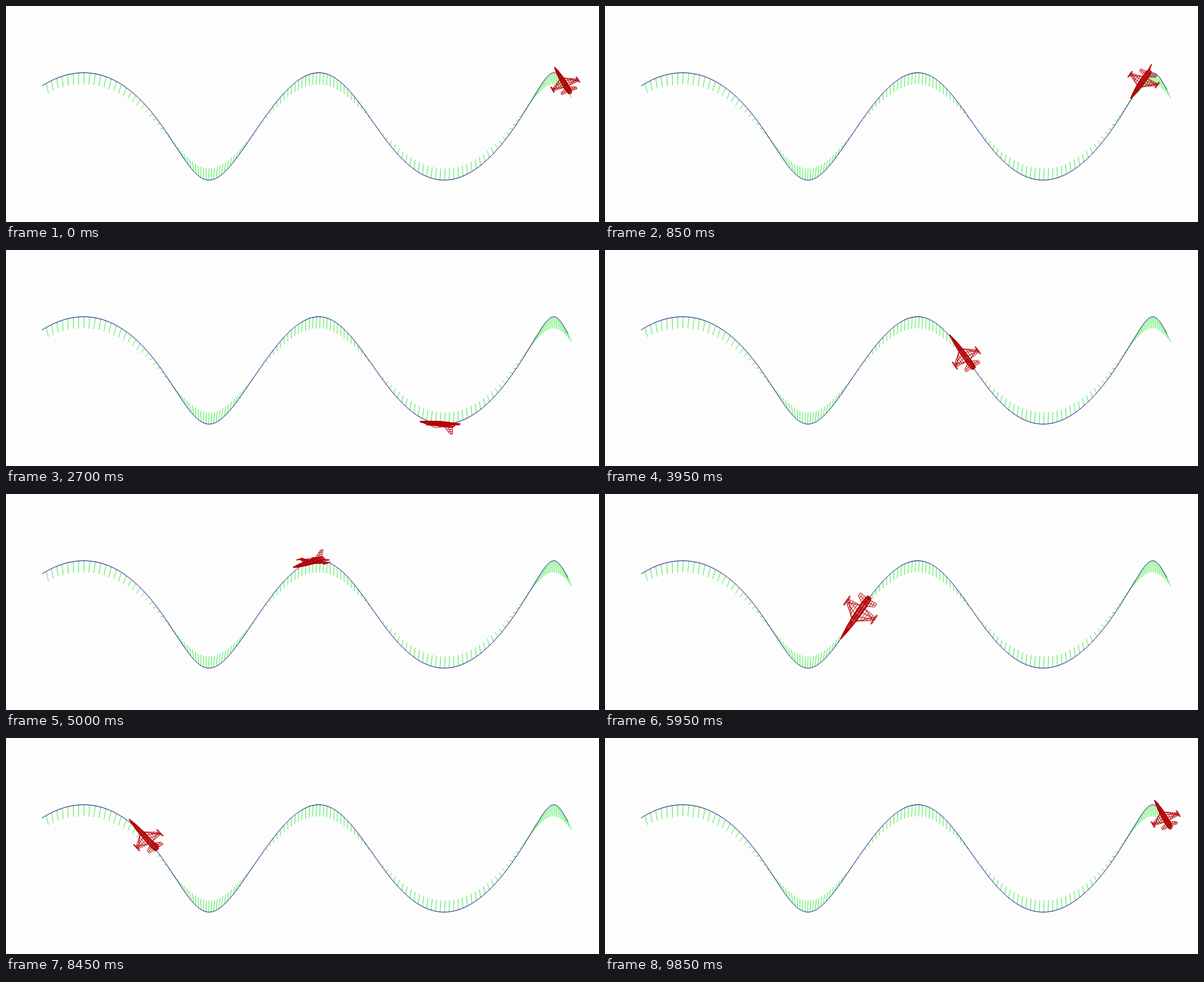
An HTML page with a canvas that plays this animation: 787x287 px, repeating every 9.9 s.

```html
<!DOCTYPE html>
<html lang="en">
<head>
<meta charset="utf-8">
<title>Flight along a curve</title>
<style>
  html, body { margin: 0; width: 100%; height: 100%; overflow: hidden; background: #fefdfe; }
  canvas { display: block; }
</style>
</head>
<body>
<canvas id="stage" width="787" height="287"></canvas>
<script>
const ctx = document.getElementById('stage').getContext('2d');
const { sin, cos, hypot, PI } = Math;
const W = 787, H = 287, LOOP = 9900, STEP = 50;
const R = 71.3, PITCH = 49.66, SHEAR = 4.52, LEAN = 5.25;
const T_MIN = -7, T_MAX = 7.11, TICK = 0.0942, TICK_SCALE = 0.215;

// Sheared helix seen from the side, with its first and second derivatives.
const point = t => [415 + PITCH * t + LEAN * (1 - cos(t)) - SHEAR * t * sin(t), 160 - R * cos(t)];
const tangent = t => [PITCH + LEAN * sin(t) - SHEAR * (sin(t) + t * cos(t)), R * sin(t)];
const bend = t => [LEAN * cos(t) - SHEAR * (2 * cos(t) - t * sin(t)), R * cos(t)];

function polyline(c, pts) {
  pts.forEach(([x, y], i) => i ? c.lineTo(x, y) : c.moveTo(x, y));
}

function drawTrack() {
  const layer = document.createElement('canvas');
  layer.width = W;
  layer.height = H;
  const c = layer.getContext('2d');
  c.fillStyle = '#fefdfe';
  c.fillRect(0, 0, W, H);

  c.lineWidth = 0.9;
  c.strokeStyle = '#4dee55';
  c.beginPath();
  for (let t = T_MIN + 0.07; t <= T_MAX; t += TICK) {
    const [x, y] = point(t), [bx, by] = bend(t);
    polyline(c, [[x, y], [x + bx * TICK_SCALE, y + by * TICK_SCALE]]);
  }
  c.stroke();

  c.lineWidth = 1;
  c.strokeStyle = '#2c2c94';
  c.beginPath();
  const pts = [];
  for (let t = T_MIN; t <= T_MAX; t += 0.02) pts.push(point(t));
  polyline(c, pts);
  c.stroke();
  return layer;
}

// Wireframe model: [forward, sideways, up]
const lerp = (p, q, k) => p.map((v, i) => v + (q[i] - v) * k);

function panel(a, b, c, d, ribs, spars) {
  const lines = [];
  for (let i = 0; i <= ribs; i++) lines.push([lerp(a, b, i / ribs), lerp(d, c, i / ribs)]);
  for (let i = 0; i <= spars; i++) lines.push([lerp(a, d, i / spars), lerp(b, c, i / spars)]);
  return lines;
}

function buildPlane() {
  const hull = [[39, 0.2], [29, 1.8], [18, 3], [8, 3.8], [-4, 4.2], [-16, 4.4], [-24, 4], [-28, 2.8]];
  const rings = hull.map(([a, r]) => Array.from({ length: 9 }, (_, i) =>
    [a, r * cos(i * PI / 4), r * 0.8 * sin(i * PI / 4)]));
  const wires = [...rings];
  for (let i = 0; i < 8; i++) wires.push(rings.map(r => r[i]));
  for (let k = 1; k < rings.length; k++)
    for (let i = 0; i < 8; i++) wires.push([rings[k - 1][i], rings[k][i + 1]]);

  for (const s of [-1, 1]) {
    wires.push(
      ...panel([8, s * 4, 0], [-5, s * 21, 0], [-10, s * 21, 0], [-12, s * 4, 0], 5, 3),
      ...panel([-16, s * 4, 0], [-21, s * 13, 0], [-26, s * 13, 0], [-25, s * 3, 0], 3, 2),
      ...panel([0, s * 21, 0], [0, s * 22.5, 0], [-14, s * 22.5, 0], [-14, s * 21, 0], 2, 2),
      [[8, s * 4, 0], [-10, s * 21, 0]],
      [[-12, s * 4, 0], [-5, s * 21, 0]]
    );
  }
  wires.push(...panel([-10, 0, 3], [-22, 0, 12], [-28, 0, 12], [-26, 0, 3], 3, 2));
  wires.push([[18, 0, 2.5], [12, 0, 5.5], [4, 0, 5.5], [-6, 0, 3.5]]);
  return { wires, rings };
}

const track = drawTrack();
const plane = buildPlane();

function drawPlane(t) {
  const [x, y] = point(t), [tx, ty] = tangent(t), [nx, ny] = bend(t);
  const len = hypot(R, tx);
  // The plane looks smaller where it climbs away from the viewer.
  const size = 1 - 0.17 * ((1 + sin(t)) / 2) ** 4;
  const fwd = [-tx / len, -ty / len];
  const side = [R / 86, -PITCH * sin(t) / 86];
  const up = [-nx / R, -ny / R];
  const project = ([a, b, c]) =>
    [0, 1].map(i => [x, y][i] + size * (a * fwd[i] + b * side[i] + c * up[i]));

  ctx.fillStyle = 'rgba(176, 0, 4, 0.4)';
  for (let k = 1; k < plane.rings.length; k++) {
    const front = plane.rings[k - 1], back = plane.rings[k];
    ctx.beginPath();
    polyline(ctx, [front[0], back[0], back[4], front[4]].map(project));
    ctx.fill();
  }
  ctx.strokeStyle = '#b40004';
  ctx.lineWidth = 0.85;
  ctx.beginPath();
  for (const wire of plane.wires) polyline(ctx, wire.map(project));
  ctx.stroke();
}

function render(ms) {
  const step = Math.floor(ms / STEP) * STEP;
  const progress = ((step + STEP) % LOOP) / LOOP;
  ctx.drawImage(track, 0, 0);
  drawPlane(6.95 - 14.06 * progress);
}

const start = performance.now();
function frame() {
  render((performance.now() - start) % LOOP);
  requestAnimationFrame(frame);
}
render(0);
requestAnimationFrame(frame);
</script>
</body>
</html>
```
